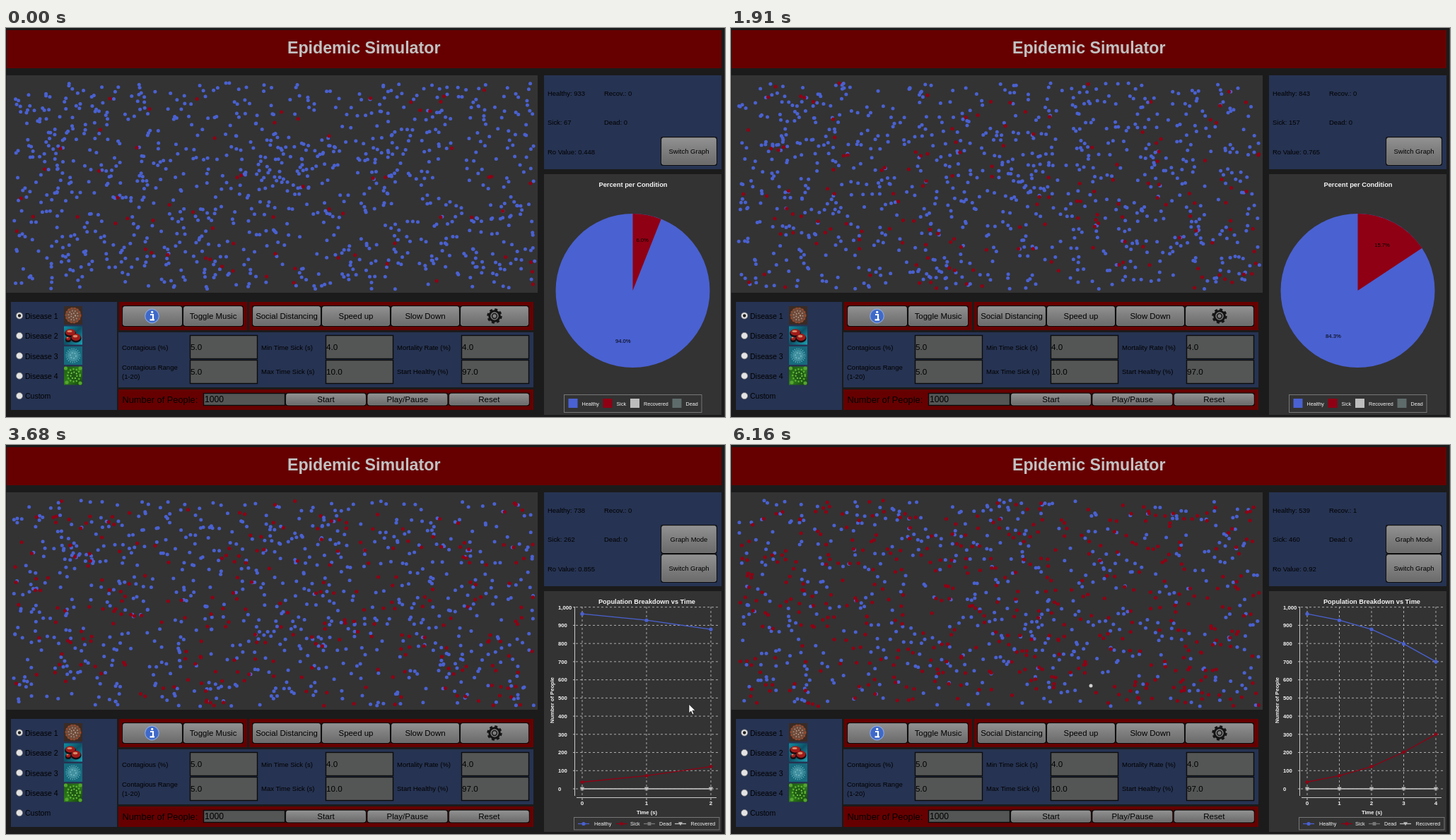
Animation, 1017 px wide and 551 px high, one loop 6230 ms. Source, as an HTML page with a canvas:

```html
<!DOCTYPE html>
<html lang="en">
<head>
<meta charset="utf-8">
<title>Epidemic Simulator</title>
<style>
  html, body { margin: 0; width: 100%; height: 100%; overflow: hidden; background: #1b1b1b; }
  svg, canvas { position: absolute; left: 0; top: 0; display: block; }
  text { font-family: "Liberation Sans", Arial, sans-serif; white-space: pre; }
</style>
</head>
<body>
<svg id="stage" width="1017" height="551" viewBox="0 0 1017 551">
  <defs>
    <linearGradient id="metal" x2="0" y2="1">
      <stop offset="0" stop-color="#929292"/><stop offset=".3" stop-color="#858585"/><stop offset="1" stop-color="#6b6b6b"/>
    </linearGradient>
    <linearGradient id="hover" x2="0" y2="1">
      <stop offset="0" stop-color="#999"/><stop offset="1" stop-color="#868686"/>
    </linearGradient>
    <linearGradient id="sea" x2="1" y2="1">
      <stop offset="0" stop-color="#0f8fa3"/><stop offset=".5" stop-color="#0d5166"/><stop offset="1" stop-color="#1aa3b4"/>
    </linearGradient>
    <linearGradient id="leaf" x2="1" y2="1">
      <stop offset="0" stop-color="#1d5a12"/><stop offset=".5" stop-color="#2f7d1c"/><stop offset="1" stop-color="#123f0c"/>
    </linearGradient>
  </defs>
</svg>
<canvas id="people" width="752" height="376"></canvas>
<script>
const LOOP = 6230, STEPS = 81, STEP = 76.95;
const BLUE = '#4a61d1', RED = '#900014', PANEL = '#263352', MAROON = '#660000', GREY = '#333';
const LIGHT = '#bdbdbd', SLATE = '#5e6b6b';
const stage = document.getElementById('stage');

function add(parent, tag, attrs, content) {
  const el = document.createElementNS('http://www.w3.org/2000/svg', tag);
  for (const key in attrs) el.setAttribute(key, attrs[key]);
  if (content !== undefined) el.textContent = content;
  parent.appendChild(el);
  return el;
}
const group = (parent = stage) => add(parent, 'g', {});
const box = (parent, x, y, x2, y2, fill, more = {}) =>
  add(parent, 'rect', { x, y, width: x2 - x, height: y2 - y, fill, ...more });
const circle = (parent, cx, cy, r, fill, more = {}) =>
  add(parent, 'circle', { cx, cy, r, fill, ...more });
const path = (parent, d, more) => add(parent, 'path', { d, ...more });
const label = (parent, x, y, size, content, more = {}) =>
  add(parent, 'text', { x, y, 'font-size': size, ...more }, content);
const centred = { 'text-anchor': 'middle' };
const whiteBold = { fill: '#f4f4f4', 'font-weight': 'bold' };

function button(parent, x, y, x2, y2, caption = '', size = 11.45) {
  box(parent, x - 1, y - 1, x2 + 1, y2 + 1, '#0e0e0e', { rx: 3 });
  const face = box(parent, x + .5, y + .5, x2 - .5, y2 - .5, 'url(#metal)',
    { rx: 2.5, stroke: '#9a9a9a', 'stroke-width': .6 });
  label(parent, (x + x2) / 2, (y + y2) / 2 + size * .36, size, caption, centred);
  return face;
}
function field(x, y, x2, y2, value, size, inset = 1) {
  box(stage, x + .5, y + .5, x2 - .5, y2 - .5, '#545656', { stroke: '#0c0c0c', 'stroke-width': 1.4 });
  label(stage, x + inset, (y + y2) / 2 + 4.3, size, value);
}

// Panels and title
box(stage, 1, 3, 1012, 57, MAROON);
label(stage, 506.2, 35.7, 23.2, 'Epidemic Simulator', { ...centred, fill: '#c2c2c2', 'font-weight': 'bold' });
box(stage, 0.5, 67, 752, 375, GREY);
box(stage, 761, 67, 1012, 200, PANEL);
box(stage, 761, 207, 1012, 548, GREY);
box(stage, 1016, 0, 1017, 551, '#3a3a3a');
box(stage, 7, 388, 157, 541, PANEL);
box(stage, 160, 388, 341, 428, MAROON);
box(stage, 344, 388, 746, 428, MAROON);
box(stage, 159, 431, 746, 509, PANEL);
box(stage, 159, 512, 746, 541, MAROON);

// Disease choices
['Disease 1', 'Disease 2', 'Disease 3', 'Disease 4', 'Custom'].forEach((name, i) => {
  const y = 407.5 + i * 28.4;
  circle(stage, 19, y, 4.6, '#e4e4e4', { stroke: '#777', 'stroke-width': .8 });
  if (!i) circle(stage, 19, y, 2.2, '#222');
  label(stage, 27, y + 4.3, 10.5, name);
});
const ring = (x, y, r, colour, width, dash) =>
  circle(stage, x, y, r, 'none', { stroke: colour, 'stroke-width': width, 'stroke-dasharray': dash });
box(stage, 82, 394, 108, 420, '#3a2b24');
circle(stage, 95, 407, 11, '#6e4a3a');
ring(95, 407, 10.3, '#a3492a', 2.2, '2 2.5');
ring(95, 407, 6.5, '#a58b7c', 2, '1.5 2.5');
ring(95, 407, 3, '#b09a8c', 2, '1.5 2');
box(stage, 82, 422.5, 108, 448.5, 'url(#sea)');
[[91, 431, 7, 4.5], [99, 438, 6.5, 5], [88, 440, 3, 2.5]].forEach(([cx, cy, rx, ry]) => {
  add(stage, 'ellipse', { cx, cy: cy + 1.5, rx: rx + 1, ry: ry + 1, fill: '#180d12' });
  add(stage, 'ellipse', { cx, cy, rx, ry, fill: '#a01c1a' });
  add(stage, 'ellipse', { cx: cx - 1, cy: cy - 1.5, rx: rx * .5, ry: ry * .35, fill: '#d88a68' });
});
box(stage, 82, 451, 108, 477, '#176a7d');
circle(stage, 95, 464, 8, '#4090a0');
ring(95, 464, 9.5, '#62aab6', 2, '1.2 1.8');
ring(95, 464, 4, '#78b8c0', 1.5, '2 2');
box(stage, 82, 479.5, 108, 505.5, 'url(#leaf)');
circle(stage, 96, 492, 7.5, '#1e5a14');
ring(96, 492, 8.8, '#62b436', 2.4, '2 2.4');
ring(96, 492, 4.5, '#7ccc4c', 1.8, '2 2');
[[84.5, 482], [86, 502], [105, 503], [105, 482]].forEach(([x, y]) => circle(stage, x, y, 2.6, '#55a52f'));

// Toolbar
button(stage, 165, 394, 249, 422);
circle(stage, 206.5, 408, 9.8, '#3e69c9', { stroke: '#8aa5df', 'stroke-width': 1.2 });
path(stage, 'M204 406H208V413M203.5 413.3H210', { fill: 'none', stroke: '#fff', 'stroke-width': 2.2 });
circle(stage, 206.7, 402.3, 1.6, '#fff');
button(stage, 251, 394, 335, 422, 'Toggle Music');
['Social Distancing', 'Speed up', 'Slow Down', ''].forEach((name, i) =>
  button(stage, 349 + i * 98, 394, 445 + i * 98, 422, name));
ring(691, 408, 7.2, '#141414', 3);
ring(691, 408, 9.4, '#141414', 2.6, '3.9 3.48');
circle(stage, 691, 408, 3.4, 'none', { stroke: '#141414', 'stroke-width': 1.5 });

// Parameters
label(stage, 164, 456.3, 9.5, 'Contagious (%)');
label(stage, 164, 484, 9.5, 'Contagious Range');
label(stage, 164, 496.5, 9.5, '(1-20)');
label(stage, 361, 456.3, 9.5, 'Min Time Sick (s)');
label(stage, 361, 490.3, 9.5, 'Max Time Sick (s)');
label(stage, 553, 456.3, 9.5, 'Mortality Rate (%)');
label(stage, 553, 490.3, 9.5, 'Start Healthy (%)');
[['5.0', '5.0'], ['4.0', '10.0'], ['4.0', '97.0']].forEach(([upper, lower], i) => {
  field(260 + i * 192, 435, 356 + i * 192, 469, upper, 11.7);
  field(260 + i * 192, 470, 356 + i * 192, 504, lower, 11.7);
});
label(stage, 164.5, 531, 12.8, 'Number of People:');
field(279, 517, 395, 535, '1000', 12.2, 2);
['Start', 'Play/Pause', 'Reset'].forEach((name, i) =>
  button(stage, 396 + i * 115.4, 517.5, 509 + i * 115.4, 534.5, name, 11.6));

// Statistics
const stat = (x, y) => label(stage, x, y, 9.45, '');
const healthyText = stat(766, 96), sickText = stat(766, 137), ratioText = stat(766, 178.5);
const recoveredText = stat(846, 96);
stat(846, 137).textContent = 'Dead: 0';
const switchFace = button(stage, 927, 155, 1005, 194, 'Switch Graph', 9.5);

// Pie chart
const PIE = { x: 886.5, y: 372, r: 109 };
const pieView = group();
label(pieView, 887, 225, 9.3, 'Percent per Condition', { ...centred, ...whiteBold });
circle(pieView, PIE.x, PIE.y, PIE.r, BLUE);
const slice = path(pieView, '', { fill: RED });
const sickShare = label(pieView, 0, 0, 7.7, '', centred);
const healthyShare = label(pieView, 0, 0, 7.7, '', centred);
box(pieView, 789.5, 519.5, 984, 544.5, 'none', { stroke: '#777' });
[['Healthy', 795.5, BLUE], ['Sick', 844.5, RED], ['Recovered', 883, LIGHT], ['Dead', 942.5, SLATE]]
  .forEach(([name, x, colour]) => {
    box(pieView, x, 525, x + 13, 538, colour);
    label(pieView, x + 19, 535, 7.2, name, { fill: '#f4f4f4' });
  });

function polar(radius, turn) {
  const a = turn * 2 * Math.PI;
  return [PIE.x + radius * Math.sin(a), PIE.y - radius * Math.cos(a)];
}
function drawPie(percent) {
  const share = percent / 100;
  slice.setAttribute('d', `M${PIE.x} ${PIE.y}V${PIE.y - PIE.r}A${PIE.r} ${PIE.r} 0 0 1 ${polar(PIE.r, share)}Z`);
  [[sickShare, percent, share / 2], [healthyShare, 100 - percent, share / 2 + .5]].forEach(([el, value, turn]) => {
    const [x, y] = polar(73, turn);
    el.setAttribute('x', x);
    el.setAttribute('y', y + 2.7);
    el.textContent = value.toFixed(1) + '%';
  });
}

// Line chart
const lineView = group();
button(lineView, 927, 114, 1005, 153, 'Graph Mode', 9.5);
label(lineView, 906.5, 225, 9.25, 'Population Breakdown vs Time', { ...centred, ...whiteBold });
label(lineView, 906.5, 523, 7.6, 'Time (s)', { ...centred, ...whiteBold });
label(lineView, 0, 0, 7.6, 'Number of People',
  { ...centred, ...whiteBold, transform: 'translate(775 361.5) rotate(-90)' });
const dashed = { stroke: '#c9c9c9', 'stroke-width': .8, 'stroke-dasharray': '3 3' };
const valueY = v => 487 - v * .2573;
for (let v = 0; v <= 1000; v += 100) {
  const y = valueY(v);
  label(lineView, 781, y + 2.8, 7.7, v.toLocaleString('en-US'), whiteBold);
  path(lineView, `M806 ${y}H1007`, dashed);
  path(lineView, `M802 ${y}H805`, { stroke: '#ddd', 'stroke-width': .8 });
}
path(lineView, 'M804.5 229V497M807 499.5H1005', { stroke: '#ddd', 'stroke-width': .9 });
box(lineView, 803.5, 527.5, 1009, 545, 'none', { stroke: '#777' });

const markers = {
  Healthy: (g, x, y) => circle(g, x, y, 2.6, BLUE),
  Sick: (g, x, y) => path(g, `M${x} ${y - 3}l3 3-3 3-3-3z`, { fill: RED }),
  Dead: (g, x, y) => box(g, x - 2.4, y - 2.4, x + 2.4, y + 2.4, '#777'),
  Recovered: (g, x, y) => path(g, `M${x - 3} ${y - 2.3}h6l-3 5z`, { fill: LIGHT })
};
const strokes = { Healthy: BLUE, Sick: RED, Dead: '#777', Recovered: LIGHT };
[['Healthy', 809, 832], ['Sick', 863, 883], ['Dead', 902, 924], ['Recovered', 946, 968.5]].forEach(([name, x, tx]) => {
  path(lineView, `M${x} 536.5h16`, { stroke: strokes[name], 'stroke-width': 1.3 });
  markers[name](lineView, x + 8, 536.5);
  label(lineView, tx, 539, 7.2, name, { fill: '#f4f4f4' });
});

const sickHistory = [37, 72, 122, 202, 300];
function buildPlot(last) {
  const g = group(lineView);
  const xs = sickHistory.slice(0, last + 1).map((_, i) => 815 + 182 * i / last);
  xs.forEach((x, i) => {
    path(g, `M${x} 229V498`, dashed);
    path(g, `M${x} 500v3`, { stroke: '#ddd', 'stroke-width': .8 });
    label(g, x, 510, 8, i, { ...centred, ...whiteBold });
  });
  const series = { Healthy: s => 1000 - s, Sick: s => s, Dead: () => 0, Recovered: () => 0 };
  for (const name in series) {
    const points = xs.map((x, i) => [x, valueY(series[name](sickHistory[i]))]);
    add(g, 'polyline', { points: points.join(' '), fill: 'none', stroke: strokes[name], 'stroke-width': 1.3 });
    points.forEach(([x, y]) => markers[name](g, x, y));
  }
  return g;
}
const plots = [2, 3, 4].map(buildPlot);

const cursor = path(stage, 'M0 0V12.5L2.9 9.8 5 14.6 7 13.7 5 9H9Z',
  { fill: '#fff', stroke: '#111', 'stroke-width': .7 });

// People: straight paths that bounce off the walls
let seed = 20207;
function random() {
  seed = (seed * 1664525 + 1013904223) >>> 0;
  return seed / 4294967296;
}
const AREA = { x: 11, y: 78, w: 737, h: 292 };
const people = Array.from({ length: 1000 }, () => {
  const x = random() * AREA.w, y = random() * AREA.h;
  const angle = random() * 2 * Math.PI, speed = .8 + random() * 2.4;
  const spread = 1 - .5 * (x / AREA.w) * (y / AREA.h);
  return { x, y, vx: speed * Math.cos(angle), vy: speed * Math.sin(angle), order: random() * spread };
}).sort((a, b) => a.order - b.order);

function bounce(value, size) {
  const m = ((value % (2 * size)) + 2 * size) % (2 * size);
  return m < size ? m : 2 * size - m;
}
const ctx = document.getElementById('people').getContext('2d');
function dot(x, y, colour) {
  ctx.fillStyle = colour;
  ctx.beginPath();
  ctx.arc(x, y, 2.5, 0, 2 * Math.PI);
  ctx.fill();
}

// Rows: step, then values that run evenly to the next row
const counts = [[0, 67, 6, .448], [15, 106, 10.1, .651], [25, 157, 15.7, .765], [39, 215, 21, .829],
  [57, 309, 30.5, .881], [68, 379, 37.5, .903], [80, 460, 45.5, .92]];
const pointer = [[34, 1018, 142], [39, 984, 159], [42, 978, 168], [52, 958, 500], [57, 961, 496],
  [68, 963, 487], [72, 975, 515], [75, 988, 551]];
const healed = [[66, 405, 330], [68, 420, 332], [80, 509, 341]];
const SWITCH = 42, HEAL = 66;

function between(rows, step) {
  let i = 0;
  while (i < rows.length - 2 && step >= rows[i + 1][0]) i++;
  const [a, b] = [rows[i], rows[i + 1]];
  const f = Math.min(1, Math.max(0, (step - a[0]) / (b[0] - a[0])));
  return a.slice(1).map((v, j) => v + (b[j + 1] - v) * f);
}
const show = (el, on) => el.setAttribute('visibility', on ? 'inherit' : 'hidden');

function draw(step) {
  const [sickValue, percent, ratio] = between(counts, step);
  const sick = Math.round(sickValue), recovered = step >= HEAL ? 1 : 0;
  healthyText.textContent = 'Healthy: ' + (1000 - sick - recovered);
  sickText.textContent = 'Sick: ' + sick;
  recoveredText.textContent = 'Recov.: ' + recovered;
  ratioText.textContent = 'Ro Value: ' + Number(ratio.toFixed(3));

  ctx.clearRect(0, 0, 752, 376);
  for (let i = 999; i >= recovered; i--) {
    const p = people[i];
    dot(AREA.x + bounce(p.x + p.vx * step, AREA.w), AREA.y + bounce(p.y + p.vy * step, AREA.h),
      i < sick + recovered ? RED : BLUE);
  }
  if (recovered) dot(...between(healed, step), '#d0d0d0');

  const lines = step >= SWITCH;
  show(pieView, !lines);
  show(lineView, lines);
  if (!lines) drawPie(percent);
  const current = step < 55 ? 0 : step < 75 ? 1 : 2;
  plots.forEach((plot, i) => show(plot, i === current));

  const [x, y] = between(pointer, step);
  show(cursor, step >= 34 && step < 75);
  cursor.setAttribute('transform', `translate(${x} ${y})`);
  const over = step < 75 && x > 927 && x < 1005 && y > 155 && y < 194;
  switchFace.setAttribute('fill', over ? 'url(#hover)' : 'url(#metal)');
}

const start = performance.now();
let shown = -1;
function tick() {
  const t = (performance.now() - start) % LOOP;
  const step = Math.min(STEPS - 1, Math.floor((t + 32) / STEP));
  if (step !== shown) draw(shown = step);
  requestAnimationFrame(tick);
}
tick();
</script>
</body>
</html>
```
